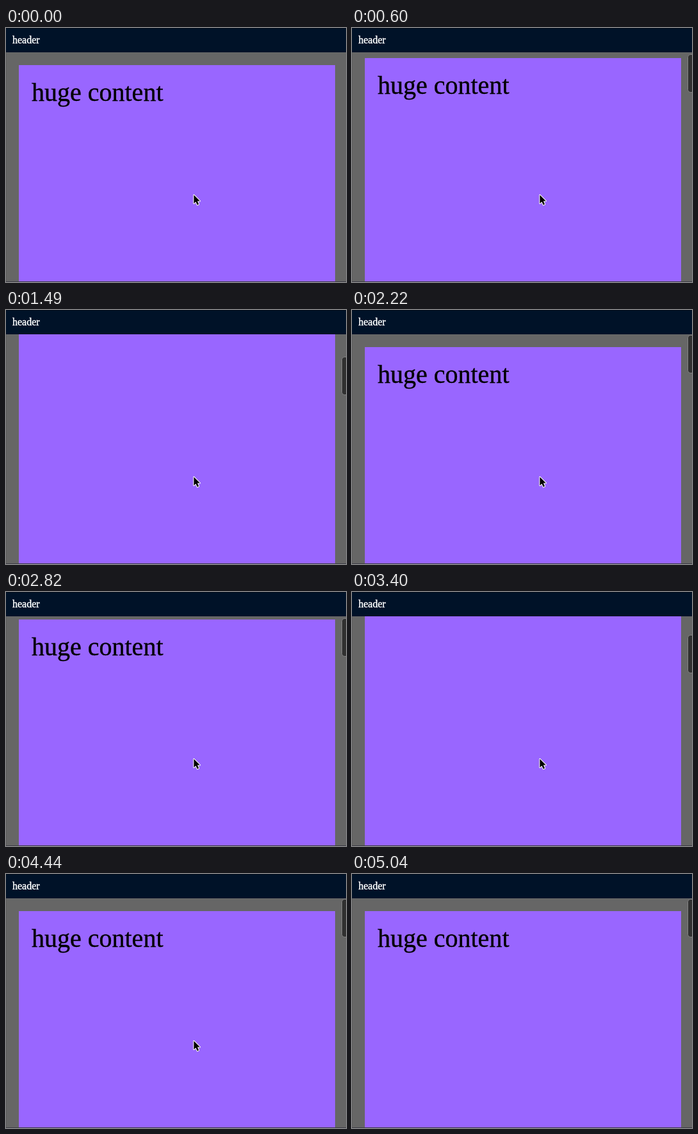
Animation, 531 px wide and 397 px high, one loop 5.34 s. Source, as an HTML page with a canvas:

```html
<!DOCTYPE html>
<html lang="en">
<head>
<meta charset="utf-8">
<title>Scrolling under a fixed header</title>
<style>
  html, body { margin: 0; width: 100%; height: 100%; overflow: hidden; background: #666; }
  canvas { display: block; }
</style>
</head>
<body>
<canvas id="stage" width="531" height="397"></canvas>
<script>
const W = 531, H = 397, HEADER = 38, LOOP = 5340;
const SERIF = '"Liberation Serif", "Times New Roman", serif';
const ctx = document.getElementById('stage').getContext('2d');

// Each swipe scrolls between two offsets in even jumps
const swipes = [
  { start: 600, end: 1490, jumps: 6, from: 11, to: 215 },
  { start: 1780, end: 2220, jumps: 3, from: 180, to: 0 },
  { start: 2820, end: 3550, jumps: 5, from: 15, to: 247 },
  { start: 3690, end: 4440, jumps: 5, from: 211, to: 0 }
];

const easeOut = p => 1 - Math.pow(1 - p, 1.3);

function scrollAt(t) {
  const swipe = swipes.findLast(s => t >= s.start);
  if (!swipe) return 0;
  const { start, end, jumps, from, to } = swipe;
  const done = Math.min(jumps, Math.floor((t - start) * jumps / (end - start)));
  return Math.round(from + (to - from) * easeOut(done / jumps));
}

function rect(x, y, w, h, color) {
  ctx.fillStyle = color;
  ctx.fillRect(x, y, w, h);
}

// A thin outline gives the letters a slightly heavier weight
function text(str, x, y, size, color) {
  ctx.font = size + 'px ' + SERIF;
  ctx.fillStyle = ctx.strokeStyle = color;
  ctx.lineWidth = 0.4;
  ctx.fillText(str, x, y);
  ctx.strokeText(str, x, y);
}

function drawContent(scroll) {
  rect(20, 58 - scroll, 494, 800, '#9966ff');
  text('huge content', 40, 114 - scroll, 40, '#000');
}

function drawThumb(scroll) {
  ctx.beginPath();
  ctx.roundRect(524.5, 39.5 + Math.round(scroll * 0.157), 12, 59, 4);
  ctx.fillStyle = '#303030';
  ctx.fill();
  ctx.lineWidth = 1;
  ctx.strokeStyle = '#858585';
  ctx.stroke();
}

function drawHeader() {
  rect(0, 0, W, HEADER, '#001228');
  rect(0, 0, W, 1, '#000a18');
  text('header', 10, 24, 16, '#fff');
}

function drawCursor(x, y) {
  const arrow = new Path2D('M.7 1.4V14.8L3.8 11.9 6 17 8.4 16 6.2 11H10.2Z');
  ctx.save();
  ctx.translate(x, y);
  ctx.lineJoin = 'round';
  ctx.lineWidth = 2;
  ctx.strokeStyle = '#fff';
  ctx.stroke(arrow);
  ctx.fillStyle = '#000';
  ctx.fill(arrow);
  ctx.restore();
}

function draw(t) {
  const scroll = scrollAt(t);
  rect(0, 0, W, H, '#666');
  drawContent(scroll);
  if (t >= swipes[0].start) drawThumb(scroll);
  drawHeader();
  rect(0, HEADER, 1, H - HEADER, '#5c5c5c');
  rect(0, H - 1, W, 1, '#3c3c44');
  if (t < 4890) drawCursor(292.7, 259.5);
  else if (t < 5040) drawCursor(381, 336);
}

const start = performance.now();
function tick() {
  draw((performance.now() - start) % LOOP);
  requestAnimationFrame(tick);
}
tick();
</script>
</body>
</html>
```
